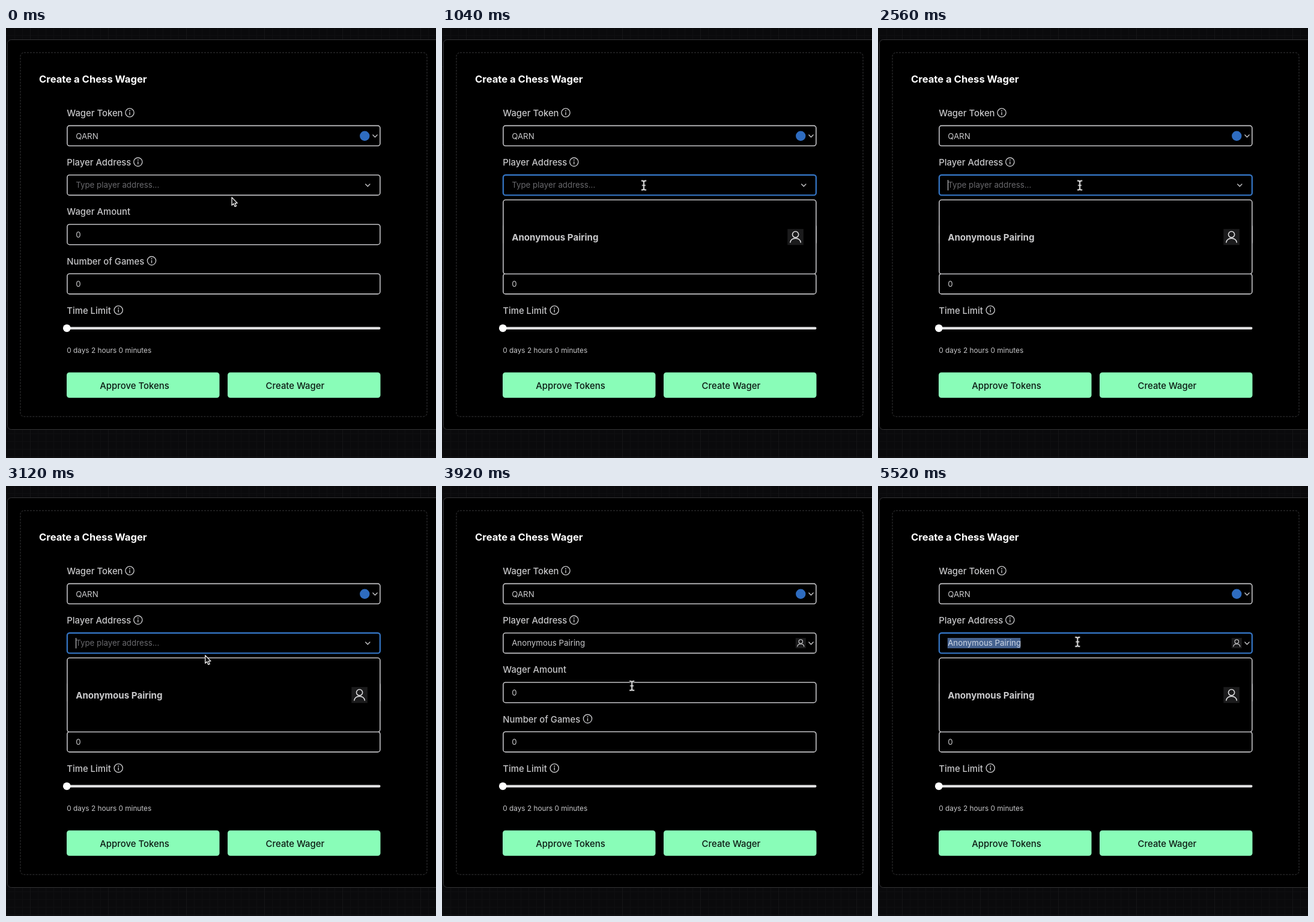
An HTML page that plays this animation: 716 px wide and 716 px high, repeating every 5.6 s.

```html
<!DOCTYPE html>
<html lang="en">
<head>
<meta charset="utf-8">
<title>Create a Chess Wager</title>
<style>
  html, body { margin: 0; width: 100%; height: 100%; overflow: hidden; background: #0a0a0c; }
  svg { display: block; width: 100vw; height: 100vh; }
  text { font-family: Inter, Roboto, "Liberation Sans", sans-serif; fill: #c6c6c8; white-space: pre; }
  .title { font-size: 16.6px; font-weight: 700; fill: #fff; }
  .label { font-size: 14.85px; font-weight: 500; }
  .input { font-size: 13.3px; fill: #c8c8ca; }
  .option { font-size: 15.1px; font-weight: 700; fill: #cacacc; }
  .small { font-size: 11.8px; }
  .action { font-size: 14.9px; font-weight: 500; fill: #0c1a13; }
  .box { fill: #000; stroke: #c2c2c5; stroke-width: 1.6; }
  .line { fill: none; stroke: #c6c6c8; stroke-width: 1.4; stroke-linecap: round; stroke-linejoin: round; }
</style>
</head>
<body>
<svg id="stage" viewBox="0 0 716 716">
  <defs>
    <pattern id="minor" x="40" y="64" width="13" height="13" patternUnits="userSpaceOnUse">
      <path d="M.5 0V13M0 .5H13" stroke="#0f0f11" fill="none"/>
    </pattern>
    <pattern id="major" x="40" y="64" width="130" height="130" patternUnits="userSpaceOnUse">
      <path d="M.5 0V130M0 .5H130" stroke="#151517" fill="none"/>
    </pattern>
    <g id="info">
      <circle class="line" r="7.1"/>
      <path class="line" d="M0 -.4V3.4"/>
      <circle r="1" cy="-3.3" fill="#c6c6c8"/>
    </g>
    <path id="chevron" class="line" d="M-3.6 -1.7L0 1.9L3.6 -1.7"/>
    <g id="person">
      <rect x="-13.3" y="-13.3" width="26.6" height="26.6" fill="#1b1b1c"/>
      <circle cy="-4.2" r="5.1" fill="none" stroke="#dcdcde" stroke-width="1.6"/>
      <path d="M-8.7 9C-8 -.2 8 -.2 8.7 9" fill="none" stroke="#dcdcde" stroke-width="1.6" stroke-linecap="round"/>
    </g>
    <path id="beamShape" d="M-3.2 -7.6Q0 -7.6 0 -5.2Q0 -7.6 3.2 -7.6M0 -5.2V5.2M-3.2 7.6Q0 7.6 0 5.2Q0 7.6 3.2 7.6M-2 0H2"/>
  </defs>
  <rect width="716" height="716" fill="#0a0a0c"/>
  <rect width="716" height="716" fill="url(#minor)"/>
  <rect width="716" height="716" fill="url(#major)"/>
  <rect x="2.5" y="19.5" width="740" height="649" rx="6" fill="#000" stroke="#343436"/>
  <rect x="24" y="41" width="677" height="606" rx="6" fill="none" stroke="#39393b" stroke-dasharray="3 2"/>
  <text class="title" x="55" y="91.2">Create a Chess Wager</text>
  <g id="form"></g>

  <rect x="101" y="497.7" width="522.5" height="4.4" rx="2" fill="#dededf"/>
  <circle cx="101.3" cy="499.8" r="6.4" fill="#fff"/>
  <text class="small" x="101.3" y="540.6">0 days 2 hours 0 minutes</text>
  <rect x="101" y="573.5" width="254.5" height="42.2" rx="4.5" fill="#89fdb8"/>
  <rect x="369" y="573.5" width="254.5" height="42.2" rx="4.5" fill="#89fdb8"/>
  <text class="action" x="156.3" y="600.5">Approve Tokens</text>
  <text class="action" x="432.6" y="600.5">Create Wager</text>

  <circle cx="597.3" cy="179.7" r="8.2" fill="#2e6cc0"/>
  <use href="#chevron" x="614.5" y="179.8"/>

  <rect id="mark" x="115.8" y="253" width="121.5" height="17.2" fill="#45628f"/>
  <text id="value" class="input" x="116.2" y="266.4"></text>
  <rect id="caret" y="253" width="1.1" height="17.4" fill="#d0d0d2"/>
  <use id="chosen" href="#person" transform="translate(597.3 261.6) scale(.64)"/>
  <use id="arrowDown" href="#chevron" y="261.8"/>

  <g id="menu">
    <rect id="menuBox" class="box" x="101.9" y="286.3" width="521" rx="4"/>
    <g id="item">
      <rect id="hover" x="103" y="300" width="519" height="96" fill="#171923"/>
      <text class="option" x="116.2" y="354.2">Anonymous Pairing</text>
      <use href="#person" x="588.6" y="348"/>
    </g>
  </g>

  <g id="cursor">
    <path id="arrow" d="M0 0V13.2L3 10.4L5.2 15.4L7.5 14.4L5.3 9.6H9.3Z" fill="#111" stroke="#eee" stroke-width="1.3" stroke-linejoin="round"/>
    <g id="beam" fill="none" stroke-linecap="round">
      <use href="#beamShape" stroke="#333" stroke-width="3.6"/>
      <use href="#beamShape" stroke="#e4e4e4" stroke-width="1.6"/>
    </g>
    <path id="hand" d="M-4.3 -.4Q-5 -2 -3.4 -2.1L0 1.2L-.6 .2L3.6 -.4Q6.6 0 6.8 3L6.3 8L5.6 11H-.2L-4.7 6.4Q-5.4 4.6 -3.6 4.7L-1.6 5.4Z" fill="#f2f2f2" stroke="#222" stroke-width=".9" stroke-linejoin="round"/>
  </g>
</svg>
<script>
const LOOP = 5600, STEP = 80;
const $ = id => document.getElementById(id);
const set = (id, attrs) => {
  for (const k in attrs) $(id).setAttribute(k, attrs[k]);
};
const show = (id, on) => set(id, { visibility: on ? "inherit" : "hidden" });

// label, row top, info icon x, value
const rows = [
  ["Wager Token", 162.6, 206, "QARN"],
  ["Player Address", 244.7, 219.8, ""],
  ["Wager Amount", 327, 0, "0"],
  ["Number of Games", 409.2, 242.5, "0"],
  ["Time Limit", 491.3, 187.2, null],
];
$("form").innerHTML = rows.map(([label, y, info, value], i) => `
  <text class="label" x="101.3" y="${y - 15.6}">${label}</text>
  ${info ? `<use href="#info" x="${info}" y="${y - 21.6}"/>` : ""}
  ${value === null ? "" : `<rect id="field${i}" class="box" x="101.9" y="${y}" width="521" height="33.7" rx="4"/>
  <text class="input" x="116.2" y="${y + 21.9}">${value}</text>`}`).join("");

const HINT = "Type player address...";
const ADDRESS = "0xA94D8630Ce60248D260B5839D84f2A60839254B0";
const PAIRING = "Anonymous Pairing";

// tables of [start, state]
const values = [[0, HINT], [1520, ADDRESS], [2400, HINT], [3680, PAIRING]];
const focus = [[0, 0], [720, .5], [800, 1], [3600, .3], [3680, 0], [4560, .5], [4640, 1]];
const menus = [[0, ""], [1040, "full"], [1520, "empty"], [2400, "full"], [3680, ""], [4720, "full"]];
const carets = [[0, 0], [720, 1], [1040, 0], [1520, 1], [2000, 0], [2400, 1], [2720, 0],
  [3040, 1], [3520, 0], [4560, 1], [4960, 0]];
const marks = [[0, 0], [5040, 1]];
const path = [[0, 376, 282], [640, 336, 262], [2960, 336, 262], [3120, 331.7, 282],
  [3600, 315.5, 336], [3840, 315.5, 336], [4480, 332.3, 259.5], [LOOP, 332.3, 259.5]];

const at = (table, t) => table.filter(s => s[0] <= t).pop()[1];
const mix = (a, b, k) => a + (b - a) * k;
const ease = k => k * k * (3 - 2 * k);
const blend = (a, b, k) => `rgb(${a.map((v, i) => Math.round(mix(v, b[i], k)))})`;

function pointer(t) {
  const i = path.findIndex(p => p[0] > t);
  const [t0, x0, y0] = path[i - 1], [t1, x1, y1] = path[i];
  const k = ease((t - t0) / (t1 - t0));
  return [mix(x0, x1, k), mix(y0, y1, k)];
}

function draw(now) {
  const t = Math.floor((now % LOOP) / STEP) * STEP;
  const text = at(values, t), menu = at(menus, t), lit = at(focus, t), marked = at(marks, t);
  const [x, y] = pointer(t);
  const full = menu === "full", picked = text === PAIRING;

  const value = $("value");
  if (value.textContent !== text) value.textContent = text;
  value.style.fill = text === HINT ? "#68686c" : marked ? "#ccd5e4" : "#c8c8ca";
  $("field1").style.stroke = blend([194, 194, 197], [50, 112, 188], lit);
  $("field1").style.strokeWidth = mix(1.6, 2.4, lit);
  show("mark", marked);
  show("chosen", picked);
  set("arrowDown", { x: picked ? 614.5 : 602.3 });

  show("caret", at(carets, t));
  const end = text === HINT ? 0 : value.getComputedTextLength();
  set("caret", { x: 116 + end });

  const over = full && y > 300 && y < 396;
  show("menu", menu);
  set("menuBox", { height: full ? 123.2 : 14.2 });
  $("menuBox").style.stroke = full ? "#c2c2c5" : "#b9b2c4";
  show("item", full);
  show("hover", over);

  const inField = (y > 244 && y < 279) || (!full && y > 326 && y < 361);
  show("beam", inField);
  show("hand", over);
  show("arrow", !inField && !over);
  set("cursor", { transform: `translate(${x} ${y})` });
}

const start = performance.now();
function tick() {
  draw(performance.now() - start);
  requestAnimationFrame(tick);
}
tick();
</script>
</body>
</html>
```
